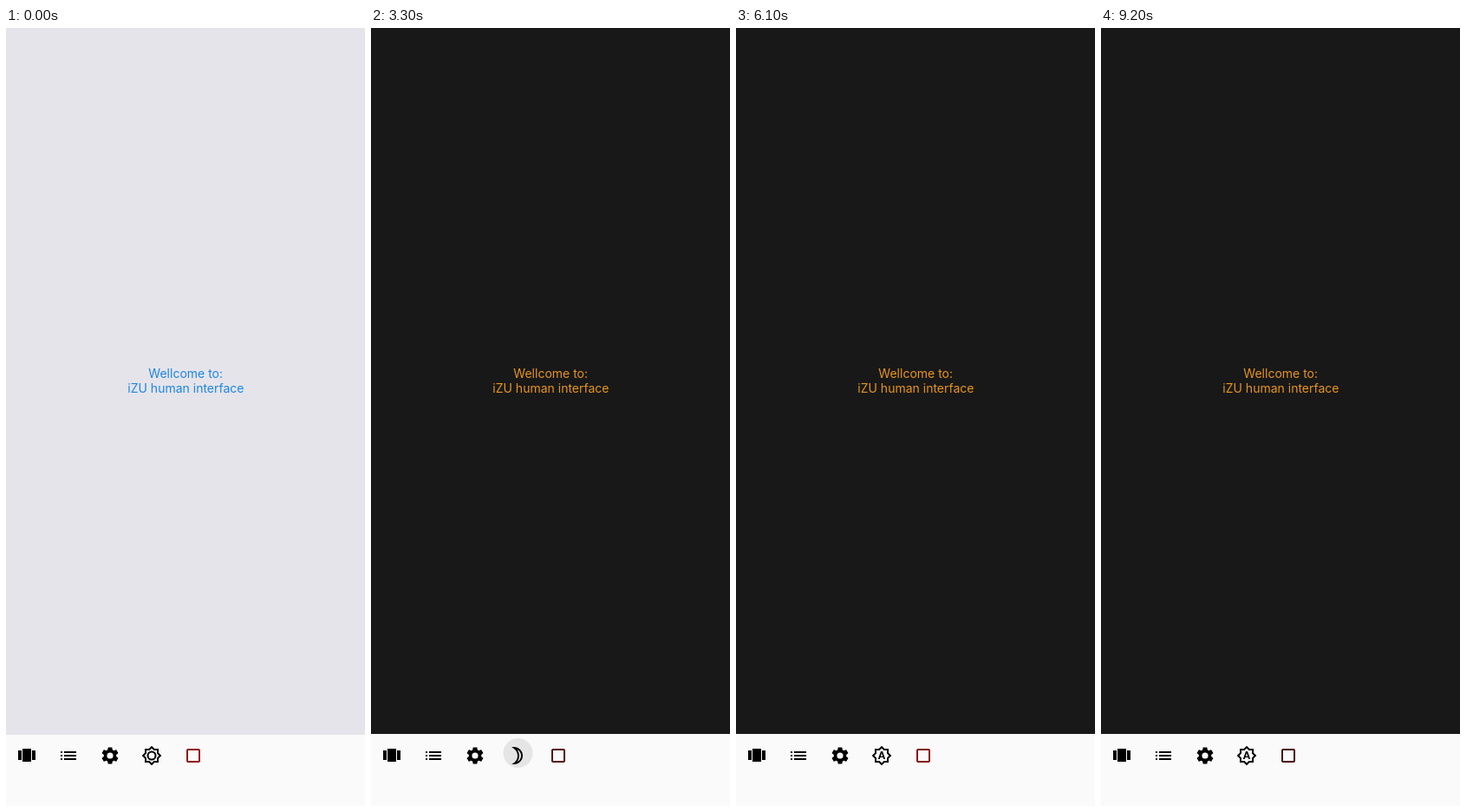
Animation of 414x896 px, one loop 9300 ms. Source, as an HTML page with a canvas:

```html
<!DOCTYPE html>
<html lang="en">
<head>
<meta charset="utf-8">
<title>Theme switch</title>
<style>
  html, body { margin: 0; width: 100%; height: 100%; overflow: hidden; background: #fafafa; }
  canvas { display: block; width: 414px; height: 896px; }
</style>
</head>
<body>
<canvas id="stage"></canvas>
<script>
const W = 414, H = 896;
const LOOP = 9300, STEP = 100;
const DARK_AT = 3300, AUTO_AT = 4600;
const BLINK = 680, BLINK_LOW = 3180;
const ICON_Y = 838;

const canvas = document.getElementById('stage');
const ctx = canvas.getContext('2d');
const scale = window.devicePixelRatio || 1;
canvas.width = W * scale;
canvas.height = H * scale;

// Icons on a 24 px grid, filled with the even-odd rule
const star = 'M20 15.31L23.31 12 20 8.69V4h-4.69L12 .69 8.69 4H4v4.69L.69 12 4 15.31V20h4.69L12 23.31 15.31 20H20z' +
  'M18 14.48V18h-3.52L12 20.48 9.52 18H6v-3.52L3.52 12 6 9.52V6h3.52L12 3.52 14.48 6H18v3.52L20.48 12z';
const ring = r => `M${12 - r} 12a${r} ${r} 0 1 0 ${2 * r} 0a${r} ${r} 0 1 0 ${-2 * r} 0z`;

const icons = {
  carousel: new Path2D('M7 19h10V4H7zM2 17h4V6H2zM18 6v11h4V6z'),
  list: new Path2D('M3 13h2v-2H3zM3 17h2v-2H3zM3 9h2V7H3zM7 13h14v-2H7zM7 17h14v-2H7zM7 7v2h14V7z'),
  gear: new Path2D('M19.14 12.94c.04-.3.06-.61.06-.94 0-.32-.02-.64-.07-.94l2.03-1.58c.18-.14.23-.41.12-.61' +
    'l-1.92-3.32c-.12-.22-.37-.29-.59-.22l-2.39.96c-.5-.38-1.03-.7-1.62-.94l-.36-2.54c-.04-.24-.24-.41-.48-.41' +
    'h-3.84c-.24 0-.43.17-.47.41l-.36 2.54c-.59.24-1.13.57-1.62.94l-2.39-.96c-.22-.08-.47 0-.59.22L2.74 8.87' +
    'c-.12.21-.08.47.12.61l2.03 1.58c-.05.3-.09.63-.09.94s.02.64.07.94l-2.03 1.58c-.18.14-.23.41-.12.61' +
    'l1.92 3.32c.12.22.37.29.59.22l2.39-.96c.5.38 1.03.7 1.62.94l.36 2.54c.05.24.24.41.48.41h3.84' +
    'c.24 0 .44-.17.47-.41l.36-2.54c.59-.24 1.13-.56 1.62-.94l2.39.96c.22.08.47 0 .59-.22l1.92-3.32' +
    'c.12-.22.07-.47-.12-.61z' + ring(3.6)),
  sun: new Path2D(star + ring(5.5) + ring(3.5)),
  moon: new Path2D('M9 2c-1.05 0-2.05.16-3 .46 4.06 1.27 7 5.06 7 9.54s-2.94 8.27-7 9.54c.95.3 1.95.46 3 .46' +
    ' 5.52 0 10-4.48 10-10S14.52 2 9 2zM12.67 4.89A8 8 0 0 1 12.67 19.11A12 12 0 0 0 12.67 4.89z'),
  auto: new Path2D(star + 'M11 7l-3.2 9h1.9l.7-2h3.2l.7 2h1.9L13 7zM10.85 12.65L12 9l1.15 3.65z'),
  square: new Path2D('M18 4H6c-1.1 0-2 .9-2 2v12c0 1.1.9 2 2 2h12c1.1 0 2-.9 2-2V6c0-1.1-.9-2-2-2z' +
    'M18 18H6V6h12z')
};

function drawIcon(name, x, color = '#000') {
  ctx.save();
  ctx.translate(x - 12, ICON_Y - 12);
  ctx.fillStyle = color;
  ctx.fill(icons[name], 'evenodd');
  ctx.restore();
}

// Triangle wave between near black and red
function blinkColor(t) {
  const phase = (((t - BLINK_LOW) / BLINK) % 1 + 1) % 1;
  const k = 1 - Math.abs(2 * phase - 1);
  return `rgb(${16 + 200 * k}, ${8 + 18 * k}, ${6 + 26 * k})`;
}

function drawRipple(age, x, y, grow, life) {
  if (age < 0 || age >= life) return;
  const k = age / life;
  ctx.fillStyle = `rgba(0, 0, 0, ${0.085 * (1 - k)})`;
  ctx.beginPath();
  ctx.arc(x, y, 17 + grow * k, 0, 2 * Math.PI);
  ctx.fill();
}

function draw(time) {
  let t = Math.floor(time % LOOP / STEP) * STEP;
  if (t < 1300) t = Math.min(t, 100);
  const dark = t >= DARK_AT;
  const barTop = dark ? 813 : 814;

  ctx.setTransform(scale, 0, 0, scale, 0, 0);
  ctx.fillStyle = dark ? '#181818' : '#e5e4ea';
  ctx.fillRect(0, 0, W, H);

  ctx.font = '14px Inter, sans-serif';
  ctx.textAlign = 'center';
  ctx.fillStyle = dark ? '#e8951c' : '#1c86e4';
  ctx.fillText('Wellcome to:', 207.2, 403);
  ctx.fillText('iZU human interface', 207.4, 420);

  ctx.save();
  ctx.beginPath();
  ctx.rect(0, barTop, W, H - barTop);
  ctx.clip();
  ctx.fillStyle = '#fafafa';
  ctx.fillRect(0, barTop, W, H - barTop);
  drawRipple(t - DARK_AT, 169.5, 835, 8, 200);
  drawRipple(t - AUTO_AT, 167, 836, 27, 300);
  ctx.restore();

  drawIcon('carousel', 24);
  drawIcon('list', 72);
  drawIcon('gear', 120);
  drawIcon(!dark ? 'sun' : t < AUTO_AT ? 'moon' : 'auto', 168);
  drawIcon('square', 216, blinkColor(t));
}

const start = performance.now();
function tick() {
  draw(performance.now() - start);
  requestAnimationFrame(tick);
}
tick();
</script>
</body>
</html>
```
